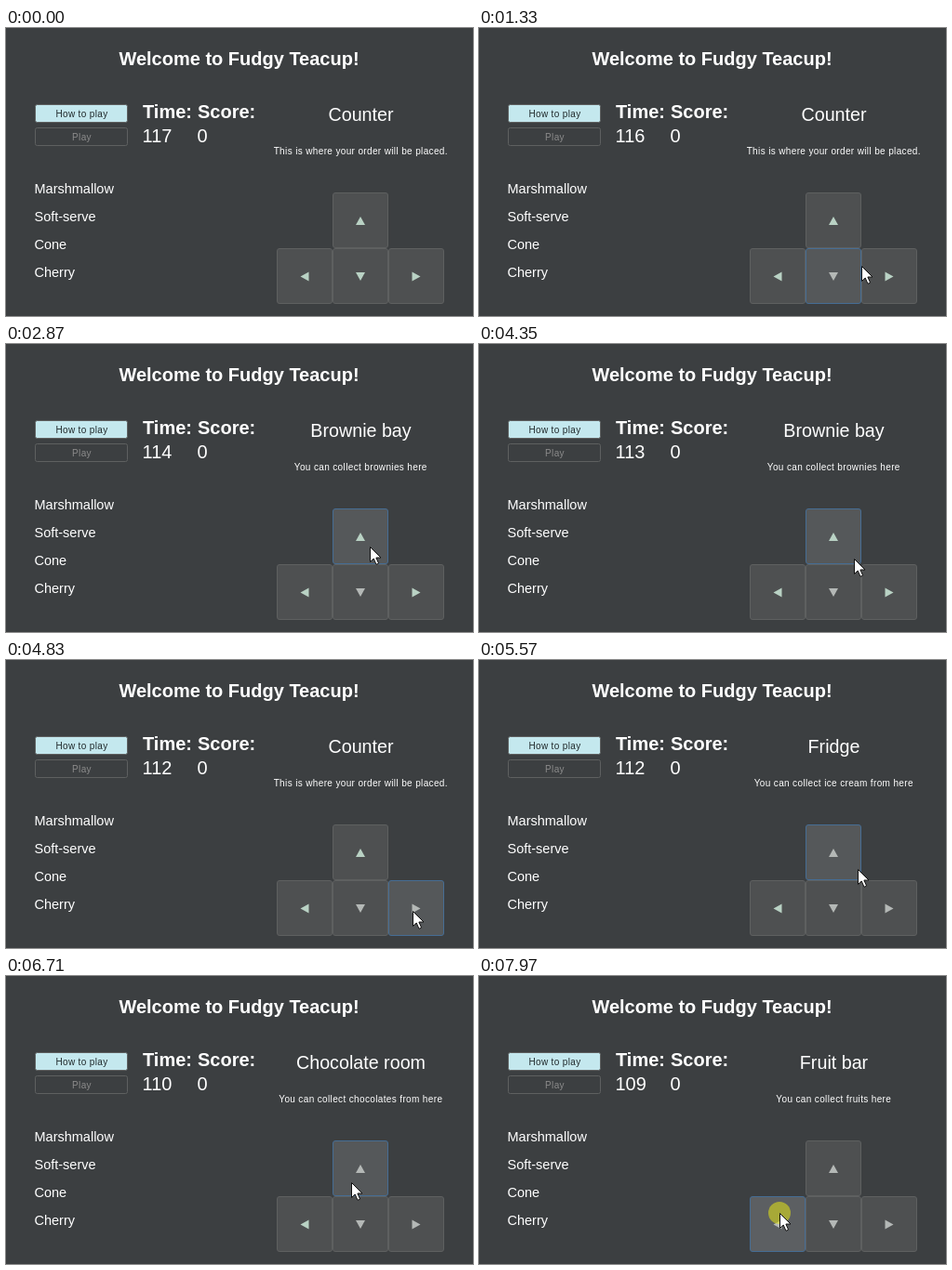
Recreate the animation shown at these times as an HTML page. Size 502 by 310 pixels, loop 8000 ms.

```html
<!DOCTYPE html>
<html lang="en">
<head>
<meta charset="utf-8">
<title>Dessert game</title>
<style>
  html, body { margin: 0; width: 100%; height: 100%; overflow: hidden; background: #3c3f41; }
  svg { display: block; width: 502px; height: 310px; }
  text { font-family: "Liberation Sans", Arial, sans-serif; fill: #fff; white-space: pre; }
  .big { font-size: 20px; }
  .bold { font-weight: bold; }
  .room { font-size: 19.7px; }
  .item { font-size: 14.5px; }
  .small { font-size: 10px; letter-spacing: .36px; }
  .mid { text-anchor: middle; }
  .btn { fill: #4e5051; stroke: #5e6060; }
  .help { fill: #c4e8ee; stroke: #5e6060; }
  .off { fill: #3c3f41; stroke: #5e6060; }
  .hover .btn { fill: #55585a; stroke: #466d94; }
  .press .btn { fill: #5c5f62; }
  .arrow { fill: #b9d2c4; }
  .used .arrow { fill: #b4b8b6; }
</style>
</head>
<body>
<svg viewBox="0 0 502 310">
  <rect width="502" height="310" fill="#3c3f41"/>
  <text class="big bold mid" x="250.5" y="40">Welcome to Fudgy Teacup!</text>

  <rect class="help" x="31.5" y="82.5" width="99" height="19" rx="2"/>
  <text class="small mid" x="81.5" y="96" style="fill:#20292b">How to play</text>
  <rect class="off" x="31.5" y="107.5" width="99" height="19" rx="2"/>
  <text class="small mid" x="81.5" y="121" style="fill:#8c8c8c">Play</text>

  <text class="big bold" x="147" y="97">Time:</text>
  <text class="big bold" x="206" y="97">Score:</text>
  <text class="big" id="time" x="146.5" y="123">117</text>
  <text class="big" x="205.5" y="123">0</text>

  <g id="list"></g>
  <text class="room mid" id="room" x="381.5" y="100"></text>
  <text class="small mid" id="note" x="381.3" y="136"></text>

  <g id="pads"></g>
  <g id="mouse">
    <circle id="spot" r="12" fill="#e6e614" fill-opacity=".55"/>
    <path d="M.5 .5V16.5L4.2 13 7 19.3 9.6 18.2 6.9 12H12Z" fill="#fff" stroke="#111"/>
  </g>
</svg>
<script>
const LOOP = 8000, STEP = 67;   // ms; all times below are in steps
const MOVE = 3, PRESS = 2, SECOND = 15;
const SIZE = 60;
const $ = id => document.getElementById(id);

$("list").innerHTML = ["Marshmallow", "Soft-serve", "Cone", "Cherry"]
  .map((s, i) => `<text class="item" x="30.5" y="${178 + 30 * i}">${s}</text>`).join("");

// The arrow turns grey at step "used"
const pads = [
  { col: 1, row: 0, turn: 0, used: 82 },
  { col: 0, row: 1, turn: -90, used: 117 },
  { col: 1, row: 1, turn: 180, used: 6 },
  { col: 2, row: 1, turn: 90, used: 67 }
];
for (const p of pads) {
  p.x = 291 + SIZE * p.col;
  p.y = 177 + SIZE * p.row;
  $("pads").insertAdjacentHTML("beforeend",
    `<g transform="translate(${p.x} ${p.y})">` +
    `<rect class="btn" x=".5" y=".5" width="${SIZE - 1}" height="${SIZE - 1}" rx="2.5"/>` +
    `<path class="arrow" d="M-5 4.5 0-4.5 5 4.5Z" transform="translate(30 30.5) rotate(${p.turn})"/></g>`);
  p.el = $("pads").lastChild;
}

// Each click, on release, leads to the next room
const clicks = [32, 70, 79, 98, 103, 119];
const counter = ["Counter", "This is where your order will be placed."];
const rooms = [
  counter,
  ["Brownie bay", "You can collect brownies here"],
  counter,
  ["Fridge", "You can collect ice cream from here"],
  ["Chocolate room", "You can collect chocolates from here"],
  ["Fruit bar", "You can collect fruits here"]
];

// Pointer moves: starting step and goal
const entry = [404, 310];
const moves = [
  [5, 388, 259], [17, 411, 256], [20, 437, 264], [25, 322, 266], [37, 391, 218],
  [64, 437, 270], [80, 407, 225], [84, 383, 210], [94, 371, 222], [114, 323, 255]
];

function pointer(k) {
  let [x, y] = entry;
  for (const [from, goalX, goalY] of moves) {
    const u = Math.min(1, Math.max(0, (k - from) / MOVE));
    const e = u * u * (3 - 2 * u);
    x += (goalX - x) * e;
    y += (goalY - y) * e;
  }
  return [Math.round(x), Math.round(y)];
}

const inside = (p, [x, y]) =>
  x >= p.x && x <= p.x + SIZE && y >= p.y && y <= p.y + SIZE;

function draw(k) {
  $("time").textContent = 117 - Math.floor((k + 5) / SECOND);
  const [name, note] = rooms[clicks.filter(c => k >= c + PRESS).length];
  $("room").textContent = name;
  $("note").textContent = note;

  const shown = k > moves[0][0];
  const pos = pointer(k);
  const down = clicks.some(c => k >= c && k < c + PRESS);
  const over = shown && pads.find(p => inside(p, pos));
  for (const p of pads) {
    p.el.classList.toggle("hover", p === over);
    p.el.classList.toggle("press", p === over && down);
    p.el.classList.toggle("used", k >= p.used);
  }
  $("mouse").style.display = shown ? "" : "none";
  $("spot").style.display = down ? "" : "none";
  $("mouse").setAttribute("transform", `translate(${pos})`);
}

let last = -1;
const start = performance.now();
function tick() {
  const t = (performance.now() - start) % LOOP;
  const k = Math.floor((t + 20) / STEP);
  if (k !== last) draw(last = k);
  requestAnimationFrame(tick);
}
tick();
</script>
</body>
</html>
```
